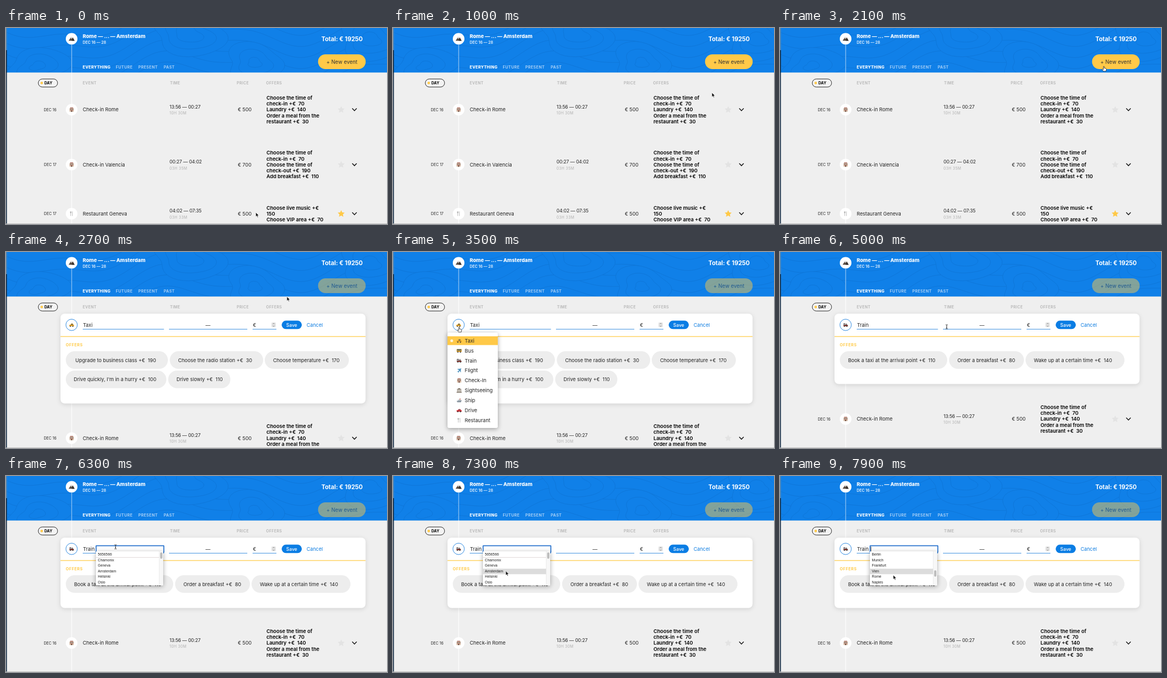
Write an HTML page that moves like this. It is 720x372 px and loops after 8000 ms.

```html
<!DOCTYPE html>
<html lang="en">
<head>
<meta charset="utf-8">
<title>Trip planner</title>
<style>
  html, body { margin: 0; width: 100%; height: 100%; overflow: hidden; background: #efefef; }
  svg { display: block; width: 720px; height: 372px; }
  text { font: 400 9.35px Inter, "Open Sans", sans-serif; fill: #222; white-space: pre; }
  .title { font-size: 9.5px; font-weight: 800; fill: #fff; }
  .dates { font-size: 7.2px; font-weight: 700; fill: #d5e8fb; }
  .total { font-size: 11.3px; font-weight: 700; fill: #fff; }
  .tab { font-size: 7.4px; font-weight: 700; letter-spacing: .4px; fill: #a3cdf6; }
  .on { font-weight: 800; fill: #fff; }
  .head { font-size: 7.2px; font-weight: 600; letter-spacing: .4px; fill: #b4b4b4; }
  .badge { font-size: 7.2px; font-weight: 800; }
  .day { font-size: 7.1px; }
  .time { font-size: 8.8px; letter-spacing: -.1px; }
  .span { font-size: 7px; letter-spacing: .4px; fill: #b0b0b0; }
  .extra { font-size: 9.5px; font-weight: 600; fill: #000; }
  .label { font-size: 7.4px; font-weight: 700; letter-spacing: .6px; fill: #ffcb4a; }
  .new { font-size: 9.8px; fill: #333; }
  .save { font-size: 8.9px; font-weight: 500; fill: #fff; }
  .link { fill: #0a7be0; }
  .type { font-size: 9.5px; }
  .city { font: 6.8px "Liberation Sans", Arial, sans-serif; fill: #222; }
  .card { filter: drop-shadow(0 2px 4px rgba(0, 0, 0, .12)); }
  .pop { filter: drop-shadow(0 2px 4px rgba(0, 0, 0, .34)); }
</style>
</head>
<body>
<svg id="stage" viewBox="0 0 720 372"></svg>
<script>
const BLUE = '#1080e8', YELLOW = '#ffc948', LOOP = 8000;

const text = (x, y, s, cls = '', attrs = '') => `<text x="${x}" y="${y}" class="${cls}" ${attrs}>${s}</text>`;
const rect = (x, y, w, h, fill, r = 0, attrs = '') =>
  `<rect x="${x}" y="${y}" width="${w}" height="${h}" rx="${r}" fill="${fill}" ${attrs}/>`;
const circle = (x, y, r, fill, attrs = '') => `<circle cx="${x}" cy="${y}" r="${r}" fill="${fill}" ${attrs}/>`;
const path = (d, fill, attrs = '') => `<path d="${d}" fill="${fill}" ${attrs}/>`;
const line = (d, color, width) => path(d, 'none', `stroke="${color}" stroke-width="${width}"`);
const group = (id, body, attrs = '') => `<g id="${id}" ${attrs}>${body}</g>`;
const at = (x, y, body, scale = 1) => `<g transform="translate(${x} ${y}) scale(${scale})">${body}</g>`;

// Small pictograms, about 10px wide, centred on 0,0
const wheels = circle(-2.6, 2.8, 1.2, '#333') + circle(2.6, 2.8, 1.2, '#333');
const icons = {
  peak: path('M-6 4L-1-4L1-1L2.5-3L6 4Z', '#5d5148') + path('M-1-4L-3-.8L-1.4-1.4L0 0L1-1Z', '#ddd')
    + path('M0 4L2.5-1L6 4Z', '#2f2a28'),
  Taxi: path('M-5 2.6V0L-2.5-.6L-1-3H2.5L4-.4L5 .3V2.6Z', '#e3a326') + path('M-1.5-.6L-.5-2.2H2L3-.6Z', '#41576b') + wheels,
  Bus: rect(-5, -3.5, 10, 6, '#d9a02f', 1) + rect(-4.2, -2.6, 8.4, 2.2, '#4b6478') + wheels,
  Train: path('M-4.5 2.8V-3.4H-.6V-.5H1V-3H2.4V-.5H4L5 2.8Z', '#4a3c3c') + rect(-3.8, -2.2, 2.2, 2.2, '#c9d3da')
    + rect(-4.5, .8, 8.8, 1.2, '#c0392b') + wheels,
  Flight: path('M4.5-4.5L2-3.6L-4-3.2L0-.6L-2.5 1.6L-4.5 1.6L-2.4 2.6L-1.5 4.6L-.8 2.8L1 .6L3.4 4L3.4-1.8Z', '#4d91bd'),
  'Check-In': rect(-4.2, -3, 8.4, 7.2, '#dcc7b2') + rect(-3, -4.4, 6, 1.6, '#a8685c') + rect(-1.2, 1.4, 2.4, 2.8, '#6b4a3d')
    + [-3.2, -.7, 1.8].map(x => rect(x, -2, 1.5, 2.2, '#75615a')).join('') + rect(-3.6, .7, 7.2, .8, '#b5655b'),
  Sightseeing: path('M-5-1.8L0-4.8L5-1.8Z', '#75695c') + rect(-5, 3, 10, 1.5, '#75695c')
    + [-4, -1.7, .6, 2.9].map(x => rect(x, -1.5, 1.3, 4.4, '#8d8070')).join(''),
  Ship: path('M-5 1L5-.6L3.6 3.8H-3.6Z', '#8c98a2') + rect(-2.6, -1.6, 4.6, 1.8, '#bcc5cc') + rect(1, -4, 1.4, 3, '#b05a50'),
  Drive: path('M-5 2.6V0L-2.5-.6L-1-2.6H2L4-.4L5 .3V2.6Z', '#cf2e35') + path('M-1.4-.6L-.6-1.8H1.6L2.6-.6Z', '#6b8292') + wheels,
  Restaurant: line('M-1.7-4.5V4.5M-2.7-4.5V-1.8H-.7V-4.5M1.7 4.5V-4.5', '#a5a5a5', .8)
};
const types = Object.keys(icons).slice(1);

// Header
function contours() {
  const stroke = 'stroke="#0e77da" stroke-width="1"';
  let out = '';
  for (let k = -3; k < 9; k++) {
    let d = '';
    for (let x = 0; x <= 720; x += 6)
      d += `${d ? 'L' : 'M'}${x} ${(k * 21 + 24 * Math.sin(x / 70) + 9 * Math.sin(x / 29 + 1) - x / 30).toFixed(1)}`;
    out += path(d, 'none', stroke);
  }
  for (const [cx, cy, size] of [[60, 72, 40], [345, 12, 48], [470, 66, 40], [690, 22, 44]])
    for (let r = size; r > 6; r -= 15) {
      let d = '';
      for (let i = 0; i < 48; i++) {
        const a = i / 48 * 2 * Math.PI;
        const q = r * (1 + .2 * Math.sin(2 * a + cx) + .12 * Math.sin(3 * a + r / 30));
        d += `${i ? 'L' : 'M'}${(cx + 1.5 * q * Math.cos(a)).toFixed(1)} ${(cy + q * Math.sin(a) * .8).toFixed(1)}`;
      }
      out += path(d + 'Z', BLUE, stroke);
    }
  return out;
}

const header = rect(0, 0, 720, 86, BLUE) + contours() + rect(0, 84.5, 720, 287.5, '#efefef')
  + rect(123.4, 32, 1.4, 52.5, '#86bff3') + rect(123.2, 84.5, 1.6, 287.5, '#fbfbfb')
  + circle(124, 20.5, 11, '#fff') + at(124, 20.5, icons.peak, .95)
  + text(145, 19, 'Rome — ... — Amsterdam', 'title') + text(145, 30.2, 'DEC 16 — 28', 'dates')
  + text(596, 24.8, 'Total: € 19250', 'total')
  + text(145, 77.3, 'EVERYTHING', 'tab on') + text(207.5, 77.3, 'FUTURE', 'tab')
  + text(250, 77.3, 'PRESENT', 'tab') + text(298, 77.3, 'PAST', 'tab')
  + group('create', rect(589.7, 50, 90, 28, YELLOW, 14) + text(605.5, 67.6, '+ New event', 'new'))
  + rect(61, 96.8, 36.5, 15.2, '#f3f3f3', 7.6, 'stroke="#222" stroke-width="1"')
  + circle(67.5, 104.4, 2.4, YELLOW) + text(72.5, 107, 'DAY', 'badge')
  + [[145, 'EVENT'], [310, 'TIME'], [436, 'PRICE'], [491.5, 'OFFERS']].map(([x, s]) => text(x, 107.2, s, 'head')).join('');

// Event rows
const starPath = 'M' + Array.from({ length: 10 }, (_, i) => {
  const r = i % 2 ? 3.4 : 6.9, a = i * Math.PI / 5;
  return `${(r * Math.sin(a)).toFixed(2)} ${(-r * Math.cos(a)).toFixed(2)}`;
}).join('L') + 'Z';

function eventRow(y, day, icon, name, time, span, price, extras, starred) {
  const top = y + 3.4 - (extras.length - 1) * 5.6;
  return text(95.3, y + 2.6, day, 'day', 'text-anchor="end"')
    + circle(124, y, 11, '#fff') + at(124, y, icons[icon], .95)
    + text(145, y + 3.4, name) + text(309, y - 2.3, time, 'time') + text(309, y + 9.2, span, 'span')
    + text(438, y + 3.4, price) + extras.map((s, i) => text(492.3, top + i * 11.2, s, 'extra')).join('')
    + at(633.4, y + .2, path(starPath, starred ? YELLOW : '#e3e3e3'))
    + line(`M654.3 ${y - 2.4}l4.2 4.4l4.2-4.4`, '#111', 1.5);
}
const rows = eventRow(155, 'DEC 16', 'Check-In', 'Check-in Rome', '13:56 — 00:27', '10H 30M', '€ 500',
    ['Choose the time of', 'check-in +€  70', 'Laundry +€  140', 'Order a meal from the', 'restaurant +€  30'])
  + eventRow(259.3, 'DEC 17', 'Check-In', 'Check-in Valencia', '00:27 — 04:02', '03H 35M', '€ 700',
    ['Choose the time of', 'check-in +€  70', 'Choose the time of', 'check-out +€  190', 'Add breakfast +€  110'])
  + eventRow(352.5, 'DEC 17', 'Restaurant', 'Restaurant Geneva', '04:02 — 07:35', '03H 33M', '€ 500',
    ['Choose live music +€', '150', 'Choose VIP area +€  70'], true);

// Form
const pill = (x, y, w, s, pad = 15.7) => rect(x, y, w, 33.5, '#ededed', 16.75) + text(x + pad, y + 20.2, s);
const formBody = (id, height, type, pills) => group(id,
  rect(103, 117, 576.5, height, '#fff', 8, 'class="card"')
  + circle(124, 138.3, 10.8, '#fff', 'stroke="#2b88e0" stroke-width="1"') + at(124, 138.5, icons[type], .9)
  + text(145.5, 141.5, type) + pills);

const form = formBody('taxi', 170.5, 'Taxi',
    pill(113, 188.3, 193, 'Upgrade to business class +€  190', 18) + pill(309.5, 188.3, 176.5, 'Choose the radio station +€  30')
    + pill(489, 188.3, 159, 'Choose temperature +€  170')
    + pill(113, 225, 190, "Drive quickly, I'm in a hurry +€  100", 15) + pill(306.5, 225, 117.5, 'Drive slowly +€  110'))
  + formBody('train', 133.5, 'Train',
    pill(113, 188.3, 203, 'Book a taxi at the arrival point +€  110') + pill(319.5, 188.3, 141.5, 'Order a breakfast +€  80')
    + pill(464, 188.3, 187, 'Wake up at a certain time +€  140'))
  + line('M145 146.5H298.5M308 146.5H456M466 146.5H511', '#3b8fe0', 1)
  + text(377, 141.5, '—') + text(466.5, 141.5, '€')
  + rect(501.5, 133.5, 8.5, 9.5, '#e6e6e6', 2) + line('M504 137l1.8-1.8l1.8 1.8M504 139.6l1.8 1.8l1.8-1.8', '#777', .9)
  + rect(521, 130.3, 38, 16, '#0a7de4', 8) + text(529.5, 141.5, 'Save', 'save') + text(568, 141.5, 'Cancel', 'link')
  + rect(103, 159.7, 576.5, 1.5, '#ffd25e') + text(113, 178.6, 'OFFERS', 'label');

const menu = rect(103, 153, 95, 181, '#fff', 3, 'class="pop"') + rect(103, 160, 95, 16.6, YELLOW)
  + circle(111, 168.4, 2.6, '#fff5da')
  + types.map((s, i) => at(125, 168.4 + i * 18.88, icons[s], .95) + text(135.6, 171.8 + i * 18.88, s, 'type')).join('');

// Destination field with its list
const cities = ['5656566', 'Chamonix', 'Geneva', 'Amsterdam', 'Helsinki', 'Oslo', 'Madrid', 'Valencia', 'Lisbon', 'Paris',
  'Lyon', 'Milan', 'Turin', 'Zurich', 'Prague', 'Dresden', 'Hamburg', 'Berlin', 'Munich', 'Frankfurt', 'Vien', 'Rome', 'Naples'];
const STEP = 10.5, LIST_TOP = 143.6;
const field = rect(170.3, 132.3, 128, 12.6, '#fff', .5, 'stroke="#2470cc" stroke-width="1.8"')
  + group('caret', rect(171.6, 134, .8, 9, '#222'));
const list = rect(170, 143, 127, 64.5, '#fff', 1, 'class="pop"')
  + '<clipPath id="view"><rect x="170" y="143" width="127" height="64.5"/></clipPath><g clip-path="url(#view)">'
  + group('hover', rect(170, 0, 119.5, STEP, '#dcdcdc'))
  + group('cities', cities.map((s, i) => text(173.5, LIST_TOP + 7.8 + i * STEP, s, 'city')).join('')
    + rect(170, 154, 119.5, .7, '#d4c9c9'))
  + '</g>' + rect(289.5, 143, 7.5, 64.5, '#f7f7f7') + rect(289.3, 143, .5, 64.5, '#ddd')
  + group('thumb', rect(291.3, 145, 4.2, 12, '#bcbcbc', 2.1));

// Pointers, hot spot on 0,0
const pointers = {
  arrow: path('M0 0V8.2L1.9 6.5L3.2 9.4L4.6 8.8L3.4 6H6Z', '#111', 'stroke="#fff" stroke-width=".7"'),
  hand: path('M-.8 0Q0-.8.8 0V3L4 3.8Q4.9 4.2 4.7 5.4L4 9H-1L-3.4 5.6Q-3.4 4.6-2.4 4.8L-.8 6Z', '#fff', 'stroke="#222" stroke-width=".8"'),
  beam: line('M-2-4Q0-4 0-3V3Q0 4-2 4M2-4Q0-4 0-3M0 3Q0 4 2 4M-1 1H1', '#222', .9)
};

document.getElementById('stage').innerHTML = header + group('rows', rows) + group('form', form) + group('menu', menu)
  + group('field', field) + group('list', list)
  + group('pointer', Object.entries(pointers).map(([id, body]) => group(id, body)).join(''))
  + rect(0, 0, 1.8, 42, '#4f88b8') + rect(0, 42, 1.8, 43, '#16324d') + rect(0, 85, 1.8, 287, '#2d4258')
  + rect(0, 371, 720, 1, '#bdbdbd');

const $ = id => document.getElementById(id);
const show = (id, on) => { $(id).style.display = on ? '' : 'none'; };
const move = (id, x, y) => $(id).setAttribute('transform', `translate(${x} ${y})`);

const track = [[0, 472, 350], [600, 528, 236], [800, 528, 236], [1100, 640, 66], [1300, 640, 66], [1900, 612, 73],
  [2600, 612, 73], [3200, 125, 143], [3700, 125, 143], [4400, 152.5, 204], [4600, 152.5, 204], [5000, 315, 142],
  [5400, 205, 137], [5900, 205, 137], [6300, 207, 134.5], [6700, 207, 134.5], [7400, 214, 188], [LOOP, 214, 188]];
const shapes = [[0, 'arrow'], [1100, 'hand'], [2700, 'arrow'], [3100, 'hand'], [4700, 'arrow'], [4900, 'beam'],
  [5100, 'arrow'], [5300, 'beam'], [6900, 'arrow']];
const scrolls = [[0, 0], [7600, 3], [7700, 8], [7800, 14], [7900, 17]];
const stepAt = (steps, t) => steps.filter(s => s[0] <= t).pop()[1];

function position(t) {
  const i = track.findIndex(k => k[0] > t);
  const [t0, x0, y0] = track[i - 1], [t1, x1, y1] = track[i];
  const p = (t - t0) / (t1 - t0);
  return [x0 + (x1 - x0) * p, y0 + (y1 - y0) * p];
}

function draw(now) {
  const t = Math.floor(now % LOOP / 100) * 100; // ten pictures a second
  const open = t >= 2300, train = t >= 4600;
  show('form', open);
  show('taxi', !train);
  show('train', train);
  move('rows', 0, train ? 162 : open ? 198.3 : 0);
  $('create').setAttribute('opacity', 1 - .52 * Math.min(1, Math.max(0, (t - 2200) / 300)));
  show('menu', t >= 3500 && !train);
  show('field', t >= 5500);
  show('caret', Math.floor((t - 5600) / 500) % 2 === 0);
  show('list', t >= 6000);

  const [x, y] = position(t), shape = stepAt(shapes, t), scroll = stepAt(scrolls, t);
  move('pointer', x, y);
  for (const id in pointers) show(id, id === shape);
  move('cities', 0, -scroll * STEP);
  move('thumb', 0, scroll * 2);
  const row = Math.floor((y - 4 - LIST_TOP) / STEP);
  show('hover', row >= 0);
  move('hover', 0, LIST_TOP + row * STEP + .8);
}

const start = performance.now();
function tick() {
  draw(performance.now() - start);
  requestAnimationFrame(tick);
}
tick();
</script>
</body>
</html>
```
